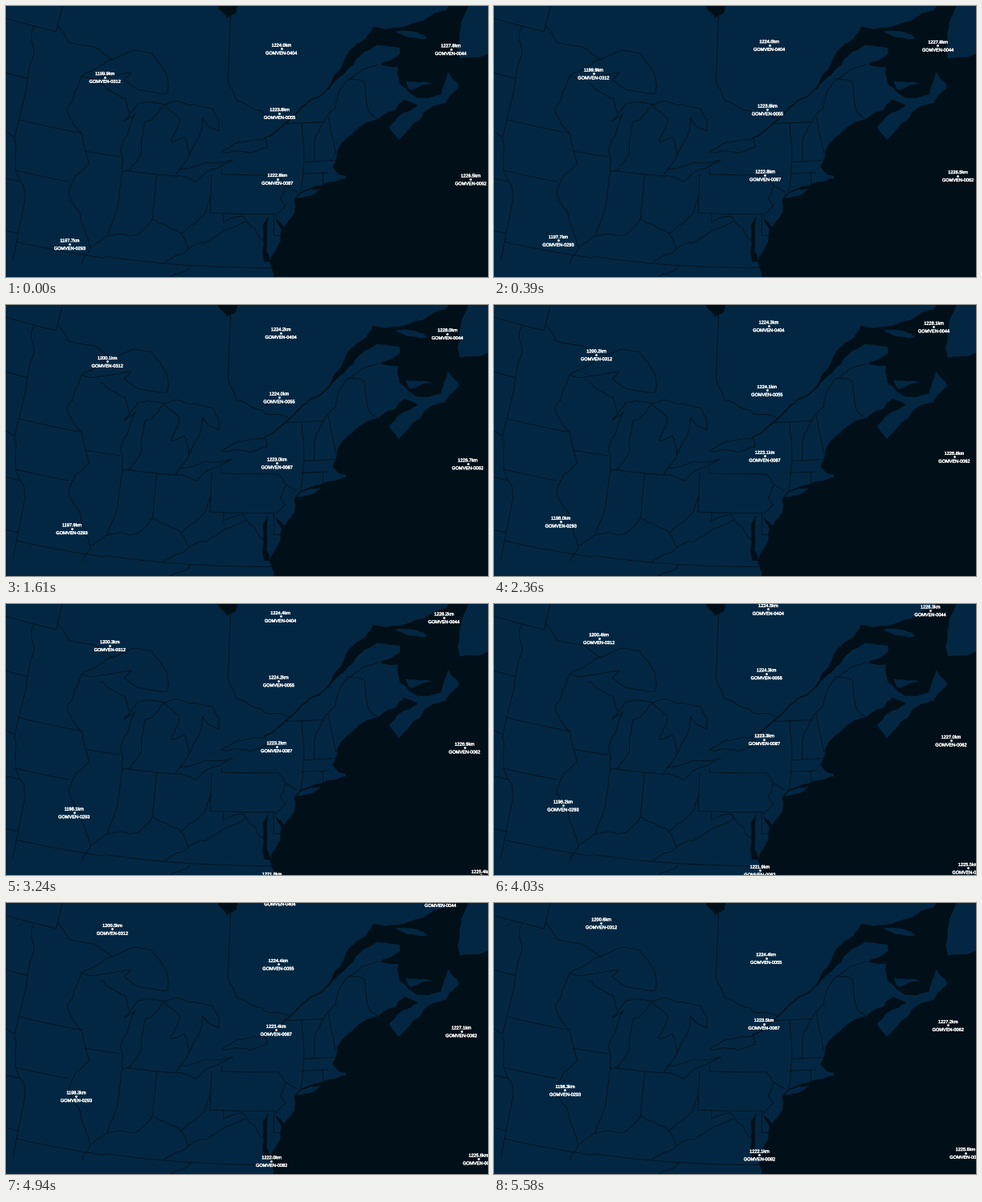
Animation of 600x338 px, one loop 5.61 s. Source, as a matplotlib script:

```python
import numpy as np
import matplotlib.pyplot as plt
from matplotlib.animation import FuncAnimation
from matplotlib.collections import LineCollection
from matplotlib.patheffects import withStroke

W, H, DPI = 600, 338, 100
FRAMES, STEP = 187, 30
LAND, SEA, BORDER = "#032742", "#010f18", "#010f1a"
PX = 72 / DPI

# Globe seen from straight above a point, with a slight roll.
LON0, LAT0, RADIUS, ROLL = -77.8, np.radians(43.95), 1226, 0.016

rng = np.random.default_rng(7)
plt.rcParams["font.family"] = "Liberation Sans"
fig = plt.figure(figsize=(W / DPI, H / DPI), dpi=DPI, facecolor=LAND)
ax = fig.add_axes([0, 0, 1, 1])
ax.set_xlim(0, W)
ax.set_ylim(H, 0)
ax.axis("off")


def project(west, north):
    """Map degrees west / degrees north to stage pixels."""
    lon, lat = np.radians(-np.asarray(west) - LON0), np.radians(north)
    x = np.cos(lat) * np.sin(lon)
    y = np.sin(LAT0) * np.cos(lat) * np.cos(lon) - np.cos(LAT0) * np.sin(lat)
    c, s = np.cos(ROLL), np.sin(ROLL)
    return np.column_stack([W / 2 + RADIUS * (x * c - y * s),
                            H / 2 + RADIUS * (x * s + y * c)])


def natural(*coords, rounds=3, rough=0.055):
    """Project key points and roughen the path by midpoint displacement."""
    pts = project(*np.reshape(coords, (-1, 2)).T)
    for _ in range(rounds):
        step = np.diff(pts, axis=0)
        normal = step[:, ::-1] * [-1, 1]
        mid = pts[:-1] + step / 2 + normal * rng.normal(0, rough, (len(step), 1))
        out = np.empty((len(pts) + len(mid), 2))
        out[::2], out[1::2] = pts, mid
        pts = out
    return pts


def closed(*coords):
    return natural(*coords, *coords[:2])


def area(color, pts, z=1):
    ax.fill(*pts.T, fc=color, ec=BORDER, lw=0.6 * PX, zorder=z)


coast = natural(
    75.5, 33, 75.7, 36, 76, 36.9, 75.2, 38.1, 75.1, 38.8, 75.55, 39.45,
    74.9, 38.95, 74.1, 39.75, 74.1, 40.5, 73.7, 40.9, 71.4, 41.45, 70, 41.6,
    70.1, 42.08, 70.05, 41.8, 70.6, 41.9, 71, 42.35, 70.7, 42.8, 70.25, 43.6,
    68.8, 44.4, 67, 44.85, 65.4, 45.3, 64.6, 45.8, 63.6, 45.35, 64.9, 45.05,
    66.2, 44.35, 65.6, 43.5, 63.6, 44.5, 61.2, 45.2, 59.8, 46, 60.5, 47,
    61.5, 45.75, 63.6, 45.85, 64.8, 46.8, 64.7, 47.75, 66.2, 48, 64.3, 48.5,
    64.3, 48.85, 66.3, 49.2, 68.3, 48.5, 70, 47.5, 71.25, 46.75, 69.9, 47.9,
    68.8, 49, 67.2, 49.6, 66.4, 50.25, 61.8, 50.15, 59.5, 50.5, 57, 52)
open_sea = project([45, 50, 75], [52, 28, 28])
area(SEA, np.vstack([coast, open_sea]))

# James Bay, Chesapeake Bay
area(SEA, closed(80.9, 52.2, 79.8, 51.15, 79, 51.5, 78.8, 52.2))
area(SEA, closed(76, 36.95, 76.4, 36.95, 76.5, 39, 76.1, 39.55, 76.2, 38.2))

# Newfoundland, Anticosti, Prince Edward Island, Long Island
area(LAND, closed(59.3, 47.6, 59, 48.5, 57.2, 50.6, 55, 51, 52, 47), z=2)
area(LAND, closed(64.5, 49.85, 62, 49.4, 61.7, 49.1, 63.6, 49.4), z=2)
area(LAND, closed(64.3, 46.9, 62, 46.45, 64, 46.3), z=2)
area(LAND, closed(74, 40.6, 73.6, 40.9, 71.9, 41.07, 72.5, 40.83), z=2)

# Upper St. Lawrence
ax.plot(*natural(71.25, 46.75, 73.4, 45.8, 74.7, 45, 76.4, 44.15).T,
        color=SEA, lw=1.4 * PX, zorder=2)

lakes = [
    closed(92.1, 46.75, 89.3, 48.2, 88.2, 48.7, 86.4, 48.75, 84.8, 47.5,
           84.6, 46.5, 87, 46.5, 88.4, 46.95, 87.9, 47.45, 90.8, 46.8),
    closed(87.5, 41.65, 87.9, 43, 87.1, 45.1, 87.9, 44.6, 87, 45.7,
           84.75, 45.85, 86.2, 44.7, 86.2, 42.8, 86.9, 41.8),
    closed(84.75, 45.8, 83.4, 45.1, 83.9, 43.7, 82.9, 44.05, 82.4, 43,
           81.7, 44.1, 81.5, 45.2, 80.1, 44.5, 80.7, 45.8, 83.8, 46.1),
    closed(83.4, 41.7, 81.7, 41.5, 78.9, 42.85, 81, 42.65, 83.1, 42.1),
    closed(79.8, 43.3, 77.5, 43.27, 76.2, 43.6, 76.3, 44.1, 78.5, 43.9),
]

# Borders along rivers and ridges, north to south
winding = [
    natural(95.15, 49.4, 93.8, 48.55, 89.6, 48),
    natural(79.52, 47.5, 78.7, 46.3, 76, 45.45, 74.4, 45.3),
    natural(71.5, 45, 70.4, 45.8, 70, 46.7, 69.2, 47.4, 67.8, 47.1),
    natural(67.8, 45.7, 67, 44.85),
    natural(69.1, 47.3, 66.4, 48.05),
    natural(97.2, 49, 96.55, 45.95, 96.45, 45.3),
    natural(98.5, 42.95, 96.45, 42.5, 95.8, 40.6, 94.6, 39.1),
    natural(92.1, 46.75, 92.75, 44.75, 91.2, 43.5, 90.2, 41.8, 91.1, 41,
            91.4, 40, 90.2, 38.7, 89.15, 37, 89.6, 36),
    natural(90.4, 46.55, 88.1, 45.9, 87.6, 45.1),
    natural(82.4, 43, 83.1, 42.1),
    natural(87.53, 39.4, 88.05, 37.8),
    natural(89.15, 37, 88.05, 37.8, 85.8, 38.1, 84.85, 39.1, 82.6, 38.4,
            80.85, 39.7, 80.52, 40.64),
    natural(77.75, 39.3, 79.7, 38.55, 81.97, 37.53, 83.7, 36.6),
    natural(82.6, 38.4, 81.97, 37.53),
    natural(81.7, 36.6, 83.5, 35.6),
    natural(79.48, 39.2, 78, 39.6, 77, 38.7, 76.3, 37.95),
    natural(75.35, 42, 74.7, 41.36, 75.2, 40.65, 74.75, 40.2, 75.55, 39.6),
    natural(74.7, 41.36, 73.9, 41),
    natural(73.35, 45, 73.26, 42.75, 73.6, 41, rough=0.02),
    natural(71.5, 45, 72.46, 42.73),
    natural(71.08, 45.3, 70.7, 43.07, rough=0.02),
]

# Surveyed borders: (latitude, west end, east end), (longitude, north, south)
parallels = [(49, 100, 95.15), (45.94, 100, 96.55), (45, 74.7, 71.5),
             (43.5, 96.45, 91.2), (42.72, 73.26, 70.9), (42.5, 90.65, 87.8),
             (42.03, 73.5, 71.4), (42, 79.76, 75.35), (41.73, 87.2, 83.45),
             (40.58, 95.8, 91.5), (40, 100, 95.3), (39.72, 80.52, 75.6),
             (38.45, 75.7, 75.05), (37, 100, 94.6), (36.5, 94.6, 88.05),
             (36.58, 88.05, 75.9)]
meridians = [(96.45, 45.3, 42.5), (95.15, 53, 49), (94.6, 39.1, 35.4),
             (87.53, 41.7, 39.4), (84.81, 41.7, 39.1), (80.52, 42, 39.72),
             (79.76, 42.27, 42), (79.52, 51.4, 47.5), (79.48, 39.72, 39.2),
             (75.7, 39.72, 38.45), (71.83, 42.03, 41.32), (67.8, 47.1, 45.7)]
straight = [project(np.linspace(a, b, 12), lat) for lat, a, b in parallels]
straight += [project(lon, np.linspace(a, b, 12)) for lon, a, b in meridians]

ax.add_collection(LineCollection(lakes + winding + straight, colors=BORDER,
                                 linewidths=0.8 * PX, zorder=3), autolim=False)

# Satellites: number, start x, start y, altitude in km
SATS = [
    ("0404", 342.7, 53.2, 1224.0),
    ("0044", 553.5, 53.8, 1227.8),
    ("0312", 123, 88.6, 1199.9),
    ("0055", 340.4, 133.6, 1223.78),
    ("0087", 337.6, 215.5, 1222.8),
    ("0062", 578.3, 216, 1226.5),
    ("0293", 79.2, 296.8, 1197.68),
    ("0082", 331.8, 379, 1221.45),
    ("0071", 598, 375, 1224.98),
]
CLIMB = 0.119  # km per second
TRIP = 5.58    # seconds of travel


def locate(x, y, t):
    """Northbound tracks lean toward the middle meridian, more so up north."""
    p, off = t / TRIP, x - 337
    dx = -1.7 - off * (0.063 - 7e-5 * y)
    dy = -65 + 0.006 * abs(off)
    return x + dx * p, y + dy * p


dots, = ax.plot([], [], "o", color="white", ms=2.8 * PX, mew=0, zorder=5)
dots.set_snap(False)


def label(text=""):
    return ax.text(0, 0, text, color="white", size=5.6 * PX, ha="center",
                   va="baseline", zorder=6,
                   path_effects=[withStroke(linewidth=0.35 * PX,
                                            foreground="white")])


heights = [label() for _ in SATS]
names = [label(f"GOMVEN-{sat[0]}") for sat in SATS]


def update(i):
    t = i * STEP / 1000
    spots = [locate(x, y, t) for _, x, y, _ in SATS]
    for (x, y), sat, height, name in zip(spots, SATS, heights, names):
        height.set_text(f"{sat[3] + CLIMB * t:.1f}km")
        height.set_position((x + 0.3, y - 2.5))
        name.set_position((x + 0.3, y + 7.3))
    dots.set_data(*zip(*spots))
    return [dots, *heights, *names]


anim = FuncAnimation(fig, update, frames=FRAMES, interval=STEP, repeat=True,
                     repeat_delay=0, blit=True)
plt.show()
```
